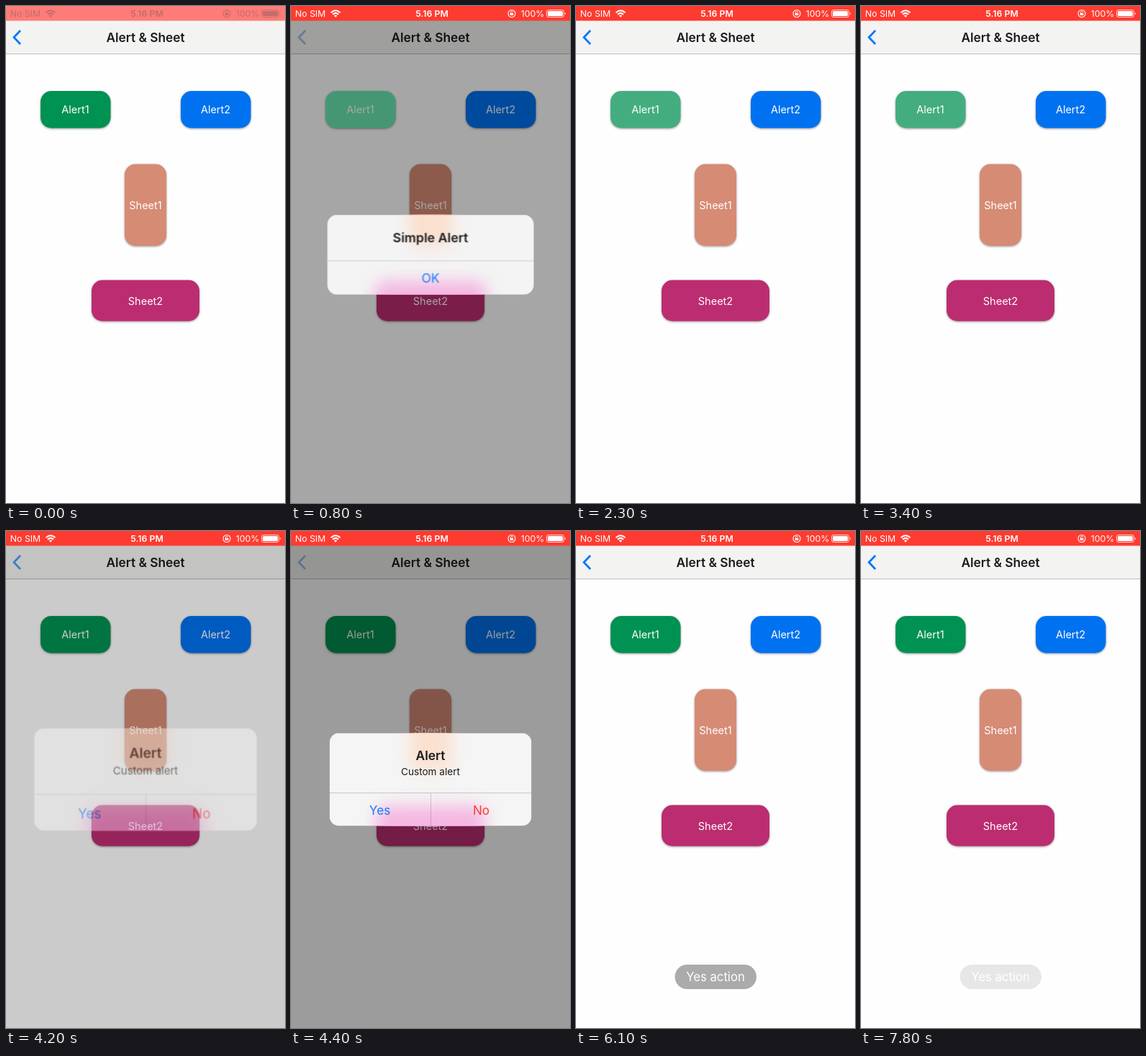
These frames come from a looping animation (388 by 690 pixels, 8000 ms). An HTML page:

```html
<!DOCTYPE html>
<html lang="en">
<head>
<meta charset="utf-8">
<title>Alert &amp; Sheet</title>
<style>
  html, body { margin: 0; width: 100%; height: 100%; overflow: hidden; background: #fefefe; }
  svg { display: block; width: 388px; height: 690px; }
  text { font-family: Inter, Roboto, sans-serif; text-anchor: middle; }
  .semi { font-weight: 600; font-size: 17.3px; fill: #1b1b1d; }
  .button text { font-size: 14.5px; fill: #fff; }
  .button rect { filter: drop-shadow(0 1px 1.5px rgba(0, 0, 0, .4)); }
  .status text { font-size: 12.3px; }
  .action { font-size: 17px; fill: #147efb; }
  .line { stroke: #000; stroke-opacity: .16; }
</style>
</head>
<body>
<svg viewBox="0 0 388 690">
  <defs>
    <filter id="blur" x="-100%" y="-100%" width="300%" height="300%"><feGaussianBlur stdDeviation="11"/></filter>
    <clipPath id="clip1"><rect x="54.5" y="291.5" width="279" height="107.5" rx="13"/></clipPath>
    <clipPath id="clip2"><rect x="54.5" y="281" width="279" height="128" rx="13"/></clipPath>
    <g id="glass">
      <rect x="50" y="275" width="288" height="140" fill="#f5f5f5"/>
      <g filter="url(#blur)">
        <rect x="165" y="220" width="58" height="113" rx="15" fill="#ffd6bc" opacity=".65"/>
        <rect x="119" y="381" width="150" height="56" rx="15" fill="#f6a2dc" opacity=".75"/>
      </g>
    </g>
  </defs>

  <rect width="388" height="690" fill="#fefefe"/>
  <rect y="20" width="388" height="46.5" fill="#f3f3f2"/>
  <path d="M0 66.5H388" stroke="#bdbdbd"/>
  <path id="back" d="M20 34L11 43.5L20 53" fill="none" stroke-width="2.8"/>
  <text class="semi" x="194" y="49.5">Alert &amp; Sheet</text>

  <g class="button">
    <rect id="first" x="48" y="118" width="97.5" height="51.5" rx="15"/>
    <text x="96.5" y="149">Alert1</text>
    <rect x="243" y="118" width="97.5" height="51.5" rx="15" fill="#0072f0"/>
    <text x="291.5" y="149">Alert2</text>
    <rect x="165" y="219.5" width="58" height="113.5" rx="15" fill="#d68b75"/>
    <text x="194" y="281.5">Sheet1</text>
    <rect x="119" y="380.5" width="150" height="57" rx="15" fill="#bb2d70"/>
    <text x="194" y="414.5">Sheet2</text>
  </g>

  <g id="toast">
    <rect x="137.5" y="602" width="113.5" height="34" rx="17"/>
    <text x="194" y="625" font-size="16.7" fill="#fff">Yes action</text>
  </g>

  <rect id="dim" y="20" width="388" height="670"/>

  <g id="simple">
    <g clip-path="url(#clip1)"><use href="#glass"/></g>
    <path class="line" d="M54.5 353.5H333.5"/>
    <text class="semi" x="194" y="328.5">Simple Alert</text>
    <text class="action" x="194" y="383">OK</text>
  </g>
  <g id="custom">
    <g clip-path="url(#clip2)"><use href="#glass"/></g>
    <path class="line" d="M54.5 363.5H333.5M194.5 363.5V409"/>
    <text class="semi" x="194" y="318">Alert</text>
    <text x="194" y="339" font-size="13.5" fill="#1b1b1d">Custom alert</text>
    <text class="action" x="124" y="393.5">Yes</text>
    <text class="action" x="264" y="393.5" style="fill:#ff3b30">No</text>
  </g>

  <rect id="bar" width="388" height="20.5"/>
  <g id="status" class="status">
    <text x="27" y="15">No SIM</text>
    <text x="196" y="15" font-weight="600">5.16 PM</text>
    <text x="336" y="15">100%</text>
    <g fill="none" stroke="currentColor">
      <path d="M55.5 9.2Q62 3.2 68.5 9.2M58 11.7Q62 8 66 11.7" stroke-width="2"/>
      <circle cx="307" cy="10.5" r="5" stroke-width="1.1"/>
      <path d="M305.5 10V8.7a1.5 1.5 0 0 1 3 0" stroke-width=".9"/>
      <rect x="355.5" y="5.5" width="24" height="10" rx="2.7" opacity=".8"/>
    </g>
    <path d="M59.8 13.2Q62 11.6 64.2 13.2L62 15.7Z"/>
    <rect x="304.7" y="9.7" width="4.6" height="3.3" rx=".5"/>
    <rect x="357" y="7" width="21" height="7" rx="1.5"/>
    <path d="M381 8.7q2 1.8 0 3.6z"/>
  </g>
</svg>
<script>
const LOOP = 8000;
const el = id => document.getElementById(id);
const ramp = (t, from, to) => Math.min(1, Math.max(0, (t - from) / (to - from)));
const mix = (a, b, k) => `rgb(${a.map((v, i) => v + (b[i] - v) * k)})`;

const alerts = [
  { node: el('simple'), open: 610, close: 1950, shade: .35 },
  { node: el('custom'), open: 4130, close: 5110, shade: .39 }
];

// Zooms one alert in or fades it out; returns how visible its backdrop is.
function poseAlert({ node, open, close }, t) {
  const enter = 1 - (1 - ramp(t, open, open + 400)) ** 3;
  const leave = ramp(t, close, close + 250);
  const scale = 1.2 - .2 * enter;
  node.setAttribute('opacity', Math.min(1, enter * 1.16) * (1 - leave));
  node.setAttribute('transform', `translate(194 345.25) scale(${scale}) translate(-194 -345.25)`);
  return Math.min(1, enter * 1.16) * (1 - leave);
}

function draw(t) {
  const shown = alerts.map(a => poseAlert(a, t));
  el('dim').setAttribute('opacity', Math.max(...alerts.map((a, i) => a.shade * shown[i])));
  el('back').setAttribute('stroke', mix([0, 120, 255], [162, 189, 224], Math.max(...shown)));

  const press = ramp(t, 450, 600) - ramp(t, 3400, 3800);
  const lit = shown[0];
  el('first').setAttribute('fill', mix([0, 146, 82], [68 + 38 * lit, 173 + 58 * lit, 128 + 48 * lit], press));

  const wake = ramp(t, 40, 350);
  el('bar').setAttribute('fill', mix([253, 124, 120], [254, 59, 48], wake));
  const ink = mix([196, 108, 105], [255, 255, 255], wake);
  el('status').setAttribute('fill', ink);
  el('status').setAttribute('color', ink);

  const fade = .09 + .41 * (1 - ramp(t, 5750, 7250)) ** 2;
  el('toast').setAttribute('visibility', t < 5650 ? 'hidden' : 'visible');
  el('toast').firstElementChild.setAttribute('fill-opacity', fade);
}

function tick() {
  draw(performance.now() % LOOP);
  requestAnimationFrame(tick);
}
tick();
</script>
</body>
</html>
```
